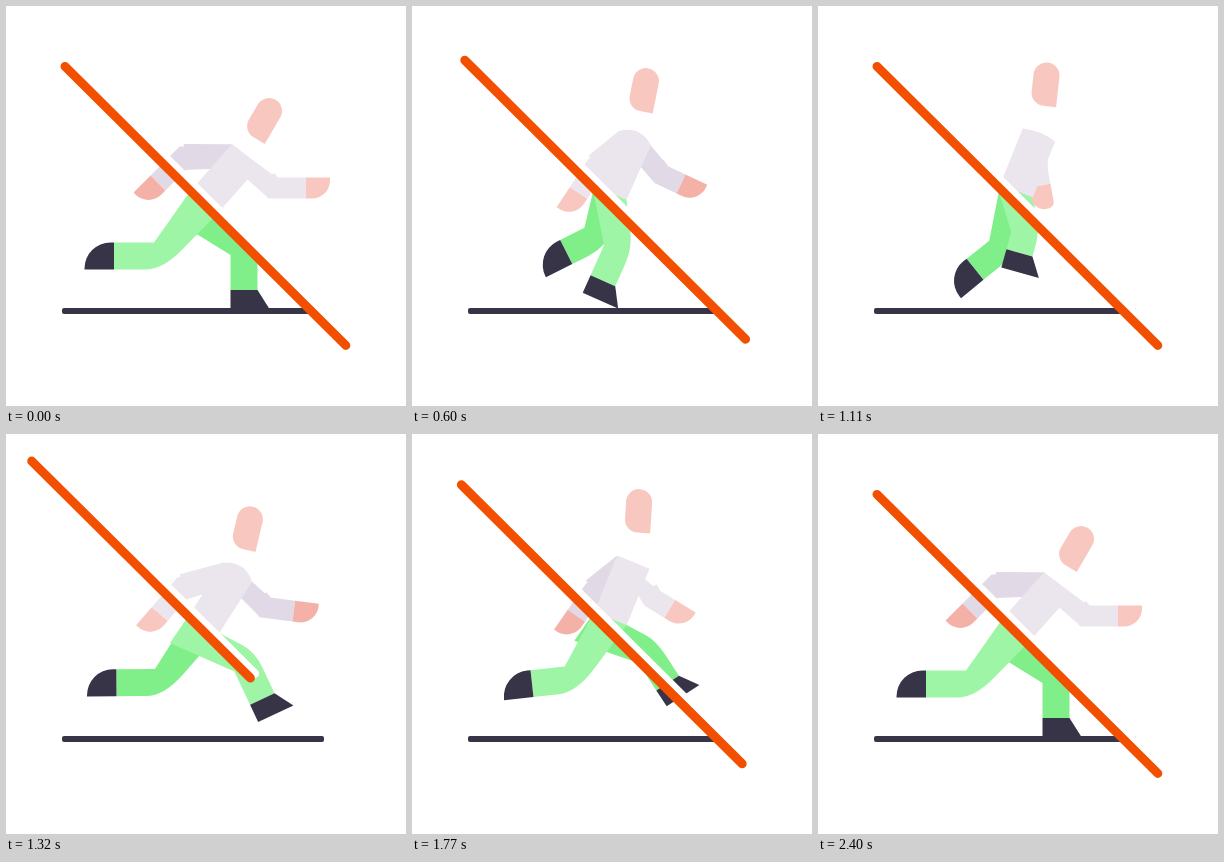
An HTML page with a canvas that plays this animation: 400x400 px, repeating every 4.43 s.

```html
<!DOCTYPE html>
<html lang="en">
<head>
<meta charset="utf-8">
<title>No running</title>
<style>
html, body { margin: 0; width: 100%; height: 100%; overflow: hidden; background: #fff; }
canvas { display: block; width: 100vw; height: 100vh; }
</style>
</head>
<body>
<canvas id="stage" width="400" height="400"></canvas>
<script>
const ctx = document.getElementById('stage').getContext('2d');
const LOOP = 4430, RUN = 2400, STEP = 30, TAU = Math.PI * 2;
const INK = '#373448', RED = '#f24f00', SHIRT = '#ebe6ee';
const NEAR = { leg: '#9ef5a6', arm: SHIRT, hand: '#f8c8c0' };
const FAR = { leg: '#80ef8a', arm: '#e1dae6', hand: '#f4b1a8' };

// time -> strides; the run slows down towards the end
const PACE = [[0, 0], [300, .55], [900, 2.12], [1320, 2.74], [1590, 3.35], [2010, 3.69], [2400, 4]];

// key poses: stride, middle joint x y, end joint x y
const LEG = [
  [0, 238, 242, 238, 284],     // stand
  [.35, 208, 238, 192, 275],   // push off
  [.55, 158, 246, 115, 248],   // lift
  [1, 155, 250, 108, 250],     // trail
  [1.35, 184, 231, 153, 246],  // pass
  [1.55, 237, 215, 262, 250]   // reach
];
const ARM = [
  [0, 267, 182, 300, 182],
  [.35, 250, 169, 270, 178],
  [.55, 177, 156, 157, 182],
  [1, 178, 151, 152, 177],
  [1.35, 184, 160, 166, 187],
  [1.55, 246, 165, 267, 174]
];

// monotone cubic through the keys, cyclic if a period is given
function at(keys, x, period = 0) {
  const len = keys.length;
  const key = (j, c) => {
    if (!period) return keys[j] && keys[j][c];
    const turns = Math.floor(j / len), v = keys[j - turns * len][c];
    return c ? v : v + turns * period;
  };
  const last = period ? len - 1 : len - 2;
  let i = 0;
  while (i < last && key(i + 1, 0) <= x) i++;
  const h = key(i + 1, 0) - key(i, 0), u = (x - key(i, 0)) / h, r = 1 - u;
  return keys[0].slice(1).map((_, n) => {
    const c = n + 1;
    const slope = j => (key(j + 1, c) - key(j, c)) / (key(j + 1, 0) - key(j, 0));
    const tangent = j => {
      const a = slope(j - 1), b = slope(j);
      if (isNaN(a)) return b;
      if (isNaN(b)) return a;
      return a * b <= 0 ? 0 : 2 * a * b / (a + b);
    };
    return key(i, c) * (1 + 2 * u) * r * r + key(i + 1, c) * u * u * (3 - 2 * u)
      + h * u * r * (tangent(i) * r - tangent(i + 1) * u);
  });
}

const clamp = v => Math.max(0, Math.min(1, v));
const add = (p, d, k) => [p[0] + d[0] * k, p[1] + d[1] * k];
const mix = (p, q, k) => [p[0] + (q[0] - p[0]) * k, p[1] + (q[1] - p[1]) * k];
const turn = d => [d[1], -d[0]];
const unit = (p, q) => {
  const x = q[0] - p[0], y = q[1] - p[1], l = Math.hypot(x, y) || 1;
  return [x / l, y / l];
};

function line(points, width, color, cap = 'butt') {
  ctx.beginPath();
  points.forEach(p => ctx.lineTo(...p));
  ctx.lineWidth = width;
  ctx.lineCap = cap;
  ctx.miterLimit = 2;
  ctx.strokeStyle = color;
  ctx.stroke();
}

function fill(color, trace) {
  ctx.beginPath();
  trace();
  ctx.fillStyle = color;
  ctx.fill();
}

const poly = points => points.forEach(p => ctx.lineTo(...p));

function placed(p, angle, paint) {
  ctx.save();
  ctx.translate(...p);
  ctx.rotate(angle);
  paint();
  ctx.restore();
}

// hand or shoe at the end of a limb
function tip(p, d, half, len, toe, r1, r2, color) {
  placed(p, Math.atan2(d[1], d[0]), () => fill(color, () => {
    ctx.moveTo(0, -half);
    ctx.arcTo(len, -half - toe, len, half, r1);
    ctx.arcTo(len, half, 0, half, r2);
    ctx.lineTo(0, half);
  }));
}

// torso and head swing once per stride
function body(p) {
  const c = Math.cos(TAU * p), s = Math.sin(TAU * p);
  const shoulder = [230 + 9 * c - 2 * s, 139 + 11 * c];
  const waist = [198.5, 190 + 5.5 * c];
  const down = unit(shoulder, waist), side = turn(down);
  return {
    shoulder, down,
    neck: add(shoulder, side, -17.5),
    corner: add(shoulder, side, 17.5),
    left: add(waist, side, -17.5),
    right: add(waist, side, 17.5),
    head: [245 + 18 * c, 86.5 + 18.5 * c],
    tilt: (17.2 + 13.3 * c + 3 * s) * TAU / 360
  };
}

function drawLeg(phase, b, tone) {
  const [kx, ky, ax, ay] = at(LEG, phase % 2, 2);
  const knee = [kx, ky], ankle = [ax, ay];
  const d = unit(knee, ankle), out = turn(d);
  const reach = clamp((kx - 205) / 25), back = clamp((-d[0] - .4) / .4);
  const bend = add(add(knee, out, 13.5), d, -2);
  fill(tone.leg, () => {
    poly([
      b.left, add(b.left, [-.57, .82], 35 * reach),
      add(add(knee, out, -13.5), d, 7),
      add(ankle, out, -13.5), add(ankle, out, 13.5), add(bend, d, 18)
    ]);
    ctx.quadraticCurveTo(...bend, ...mix(b.right, bend, .65));
    ctx.lineTo(...b.right);
  });
  tip(ankle, d, 13.5, 19 + 10.5 * back, 12 * (1 - back), 0, 26 * back, INK);
}

function drawArm(phase, b, tone) {
  const [ex, ey, wx, wy] = at(ARM, phase % 2, 2);
  const elbow = [ex, ey], wrist = [wx, wy];
  const front = clamp((wx - 190) / 50), half = 13 - 2.5 * front;
  let n = turn(unit(b.shoulder, elbow));
  if (n[1] > 0) n = [-n[0], -n[1]];
  const top = tone === FAR ? mix(b.neck, b.corner, front) : b.neck;
  fill(tone.arm, () => poly([
    top, add(elbow, n, half), add(elbow, n, -half), add(b.shoulder, b.down, 16)
  ]));
  line([mix(b.shoulder, elbow, .75), elbow, wrist], 21, tone.arm);
  tip(wrist, unit(elbow, wrist), 10.5, 24, 0, 18 * (1 - front), 18 * front, tone.hand);
  return front;
}

function drawTorso(b, bulge) {
  fill(SHIRT, () => {
    ctx.moveTo(...b.neck);
    ctx.quadraticCurveTo(...add(b.shoulder, b.down, -bulge), ...b.corner);
    poly([b.right, b.left]);
  });
}

function drawHead(b) {
  placed(b.head, b.tilt, () => fill(NEAR.hand, () => {
    ctx.arc(0, 0, 13, Math.PI, 0);
    ctx.lineTo(13, 30.5);
    ctx.arcTo(-13, 30.5, -13, 0, 13);
    ctx.closePath();
  }));
}

// the bar draws back, gets shorter, then springs into place
function drawBar(t) {
  const q = t % 1200, pull = 206, swing = 175;
  let slide = 0;
  if (q < pull) slide = -42 * Math.sin(q / pull * TAU / 4);
  else if (q < 810) {
    const u = (q - pull) / swing;
    slide = -42 * Math.cos(Math.PI * u) * Math.pow(.5, u);
  }
  const squash = q < 345 ? 70 * Math.sin(Math.PI * q / 345) : 0;
  const from = [59 + slide, 60.4 + slide];
  const to = [339.8 + slide - squash, 339.4 + slide - squash];
  const gap = [4.3, -4.3];
  line([add(from, gap, 1), add(to, gap, 1)], 9, '#fff', 'round');
  line([from, to], 9, RED, 'round');
}

function draw(ms) {
  const t = Math.min(RUN, Math.floor(ms / STEP) * STEP);
  const p = at(PACE, t)[0], b = body(p);
  ctx.fillStyle = '#fff';
  ctx.fillRect(0, 0, 400, 400);
  fill(INK, () => ctx.roundRect(56, 302, 262, 6, 2));
  drawArm(p + 1, b, FAR);
  drawLeg(p, b, FAR);
  drawLeg(p + 1, b, NEAR);
  const front = drawArm(p, b, NEAR);
  drawTorso(b, 14 * (1 - front));
  drawHead(b);
  drawBar(t);
}

const start = performance.now();
function tick() {
  draw((performance.now() - start) % LOOP);
  requestAnimationFrame(tick);
}
tick();
</script>
</body>
</html>
```
